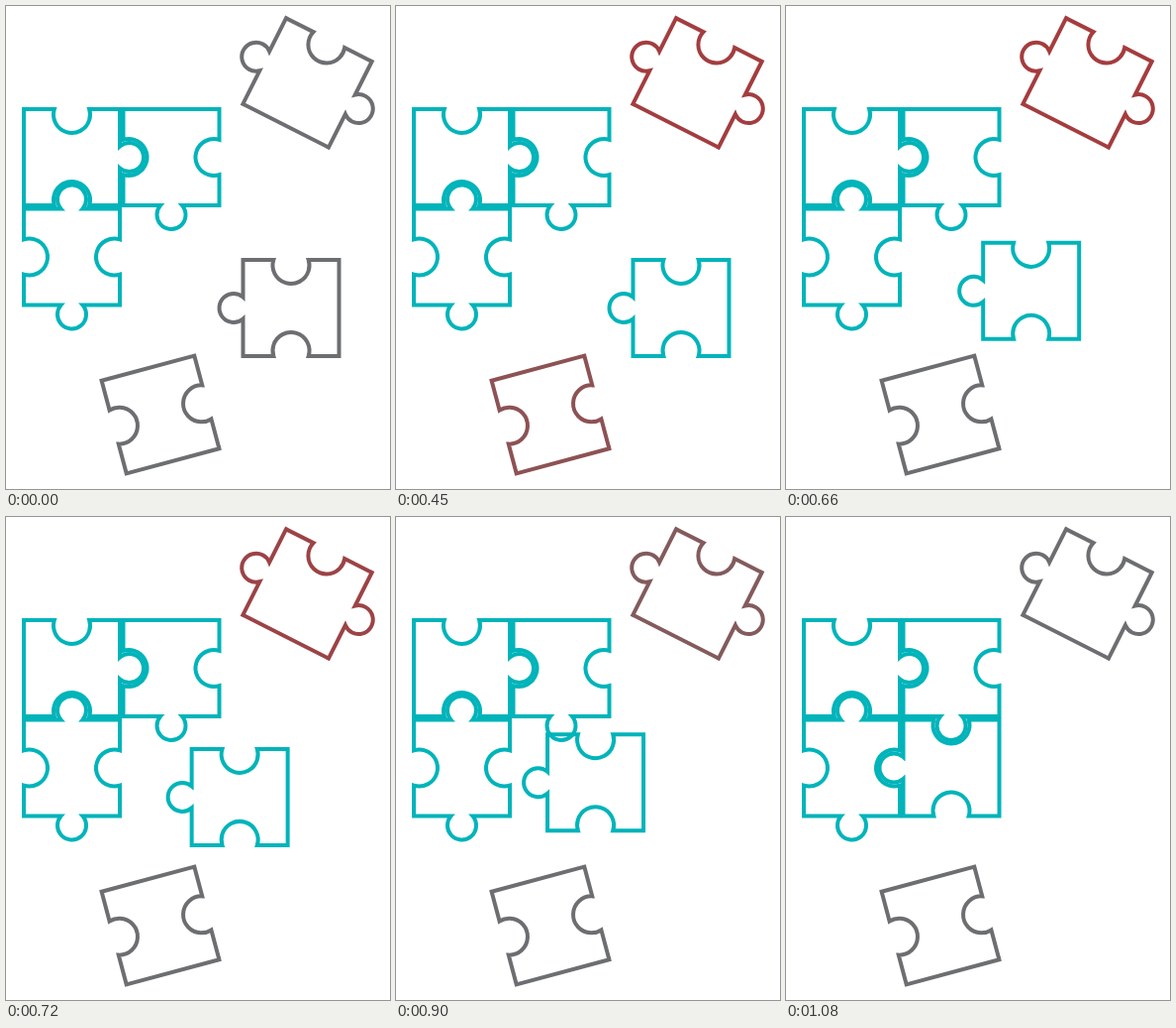
These frames come from a looping animation (388x487 px, 2.21 s). An HTML page with a canvas:

```html
<!DOCTYPE html>
<html lang="en">
<head>
<meta charset="utf-8">
<title>Puzzle</title>
<style>
  html, body { margin: 0; width: 100%; height: 100%; overflow: hidden; background: #fff; }
  canvas { display: block; }
</style>
</head>
<body>
<canvas id="stage" width="388" height="487"></canvas>
<script>
const ctx = document.getElementById('stage').getContext('2d');

const LOOP = 2210, STEP = 30, LAST = 36;
const HALF = 48.5;
const TAB = { r: 14.5, out: 9.5 };
const SOCKET = { r: 18.5, out: -5.5 };
const FLAT = null;

const GRAY = [109, 110, 113], TEAL = [0, 180, 186], RED = [178, 48, 50];

// Sides run clockwise: top, right, bottom, left.
const board = [
  { x: 66.5, y: 152.5, sides: [SOCKET, TAB, SOCKET, FLAT] },
  { x: 167, y: 152.5, sides: [FLAT, SOCKET, TAB, SOCKET] },
  { x: 66.5, y: 253, sides: [TAB, SOCKET, TAB, SOCKET] }
];
const upper = { x: 304.5, y: 77.4, angle: 26.8, sides: [SOCKET, TAB, FLAT, TAB] };
const lower = { x: 156, y: 412, angle: -15, sides: [FLAT, SOCKET, FLAT, SOCKET] };
const mover = { sides: [SOCKET, FLAT, SOCKET, TAB] };
const from = { x: 288, y: 304.5 }, to = { x: 167, y: 253 };

const lerp = (a, b, k) => a + (b - a) * k;
const ramp = (v, a, b) => Math.min(1, Math.max(0, (v - a) / (b - a)));
const mix = (a, b, k) => `rgb(${a.map((v, i) => Math.round(lerp(v, b[i], k))).join(',')})`;
const flash = (n, peak, end) => mix(GRAY, RED, n < peak ? ramp(n, 0, peak) : 1 - ramp(n, peak, end));

function addSide(path, side, turn) {
  const edge = new Path2D();
  edge.moveTo(-HALF, -HALF);
  if (side) {
    const cy = -HALF - side.out;
    const half = Math.sqrt(side.r ** 2 - side.out ** 2);
    const start = Math.atan2(side.out, -half), end = Math.atan2(side.out, half);
    edge.lineTo(-half, -HALF);
    edge.arc(0, cy, side.r, start, end, side === SOCKET);
  }
  edge.lineTo(HALF, -HALF);
  path.addPath(edge, new DOMMatrix().rotate(turn * 90));
}

function outline(sides) {
  const path = new Path2D();
  sides.forEach((side, i) => addSide(path, side, i));
  return path;
}

for (const piece of [...board, upper, lower, mover]) piece.path = outline(piece.sides);

function draw(piece, color) {
  ctx.save();
  ctx.translate(piece.x, piece.y);
  ctx.rotate((piece.angle || 0) * Math.PI / 180);
  ctx.strokeStyle = color;
  ctx.stroke(piece.path);
  ctx.restore();
}

function render(time) {
  const n = Math.min(LAST, Math.floor((time % LOOP) / STEP));
  ctx.fillStyle = '#fff';
  ctx.fillRect(0, 0, 388, 487);
  ctx.lineWidth = 4;
  ctx.lineCap = 'square';

  for (const piece of board) draw(piece, mix(TEAL, TEAL, 0));
  draw(upper, flash(n, 19, 35));
  draw(lower, flash(n, 8.5, 20.5));

  const k = ramp(n, 15, LAST);
  mover.x = lerp(from.x, to.x, k);
  mover.y = lerp(from.y, to.y, k);
  draw(mover, mix(GRAY, TEAL, ramp(n, 4, 14)));
}

const begin = performance.now();
function tick() {
  render(performance.now() - begin);
  requestAnimationFrame(tick);
}
tick();
</script>
</body>
</html>
```
